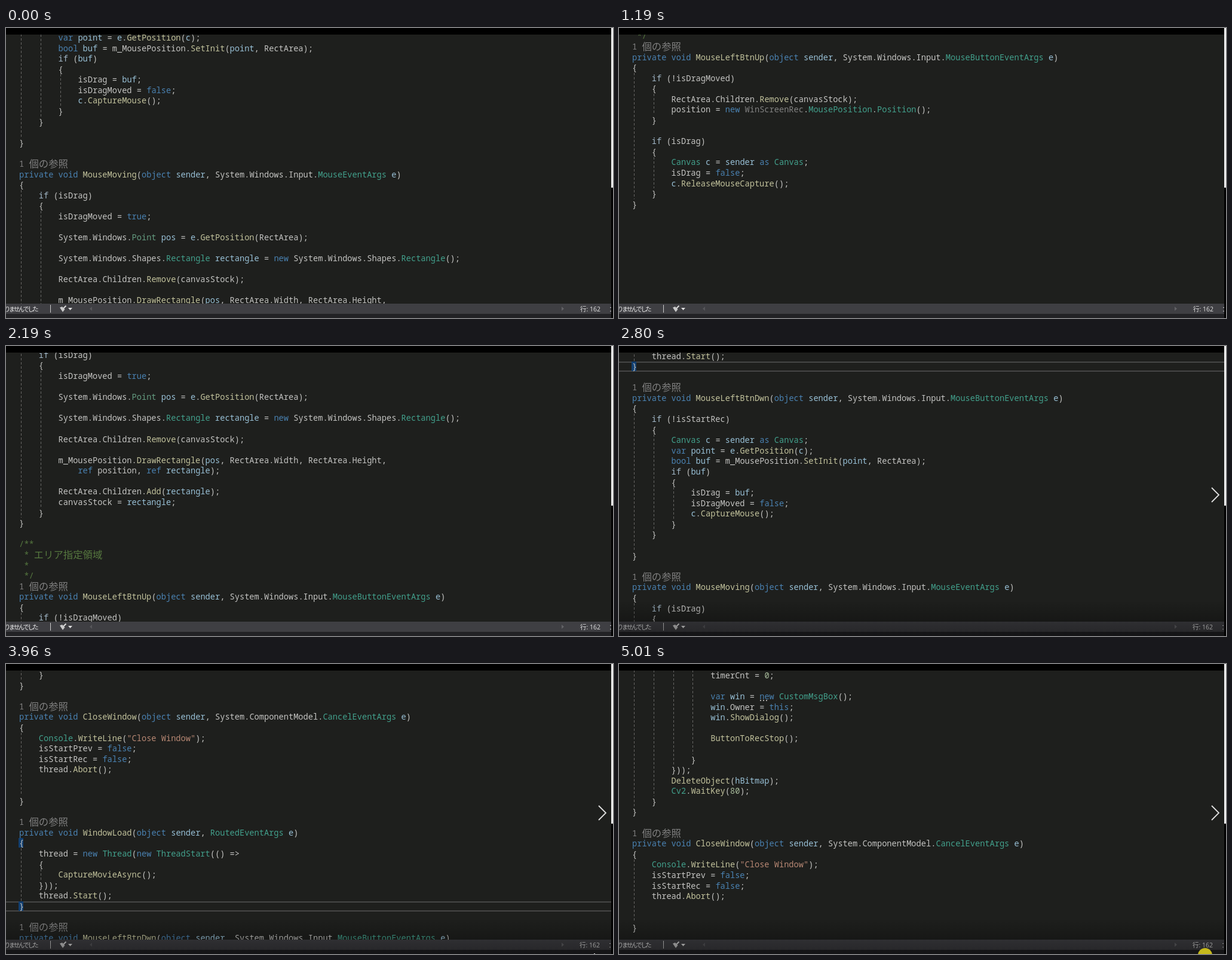
These frames come from a looping animation (1016 by 485 pixels, 5.08 s). An HTML page with a canvas:

```html
<!DOCTYPE html>
<html lang="ja">
<head>
<meta charset="utf-8">
<title>Code scroll</title>
<style>
html, body { margin: 0; width: 100%; height: 100%; overflow: hidden; background: #000; }
canvas { display: block; }
</style>
</head>
<body>
<canvas id="stage" width="1016" height="485"></canvas>
<script>
const ctx = document.getElementById('stage').getContext('2d');
const LOOP = 5080;
const LEFT = 22, COL = 8.2, LINE = 17.58;
const HOME = 244.5, NOTCH = 52.95;   // centre of line 0 at rest, wheel notch
const FIRST = -55;                   // index of the first line of the listing
const TOP = 11, BOTTOM = 461, RIGHT = 1013;

const code = `                timerCnt = 0;

                var win = new CustomMsgBox();
                win.Owner = this;
                win.ShowDialog();

                ButtonToRecStop();

            }
        }));
        DeleteObject(hBitmap);
        Cv2.WaitKey(80);
    }
}

1 個の参照
private void CloseWindow(object sender, System.ComponentModel.CancelEventArgs e)
{
    Console.WriteLine("Close Window");
    isStartPrev = false;
    isStartRec = false;
    thread.Abort();


}

1 個の参照
private void WindowLoad(object sender, RoutedEventArgs e)
{
    thread = new Thread(new ThreadStart(() =>
    {
        CaptureMovieAsync();
    }));
    thread.Start();
}

1 個の参照
private void MouseLeftBtnDwn(object sender, System.Windows.Input.MouseButtonEventArgs e)
{
    if (!isStartRec)
    {
        Canvas c = sender as Canvas;
        var point = e.GetPosition(c);
        bool buf = m_MousePosition.SetInit(point, RectArea);
        if (buf)
        {
            isDrag = buf;
            isDragMoved = false;
            c.CaptureMouse();
        }
    }

}

1 個の参照
private void MouseMoving(object sender, System.Windows.Input.MouseEventArgs e)
{
    if (isDrag)
    {
        isDragMoved = true;

        System.Windows.Point pos = e.GetPosition(RectArea);

        System.Windows.Shapes.Rectangle rectangle = new System.Windows.Shapes.Rectangle();

        RectArea.Children.Remove(canvasStock);

        m_MousePosition.DrawRectangle(pos, RectArea.Width, RectArea.Height,
            ref position, ref rectangle);

        RectArea.Children.Add(rectangle);
        canvasStock = rectangle;
    }
}

/**
 * エリア指定領域
 *
 */
1 個の参照
private void MouseLeftBtnUp(object sender, System.Windows.Input.MouseButtonEventArgs e)
{
    if (!isDragMoved)
    {
        RectArea.Children.Remove(canvasStock);
        position = new WinScreenRec.MousePosition.Position();
    }

    if (isDrag)
    {
        Canvas c = sender as Canvas;
        isDrag = false;
        c.ReleaseMouseCapture();
    }
}`.split('\n');

const words = s => new Set(s.split(' '));
const keywords = words('private void object var bool new as ref true false this');
const types = words('CustomMsgBox Cv2 CancelEventArgs Console RoutedEventArgs Thread ThreadStart ' +
  'MouseButtonEventArgs MouseEventArgs Canvas Rectangle MousePosition Position');
const locals = words('win hBitmap sender e c point buf pos rectangle');

const color = {
  plain: '#c4c4c2', keyword: '#4a82b2', branch: '#a2b8c8', type: '#42a08c', struct: '#649c80',
  method: '#c2c29c', local: '#98c0d6', string: '#b88874', number: '#a8bc9c', comment: '#56783f',
  lens: '#808080', faded: '#828282'
};

// Font size chosen so that one column is exactly COL wide
const mono = '"Noto Sans Mono", "Noto Sans Mono CJK JP", monospace';
const kanji = '"Noto Sans CJK JP", "Noto Sans Mono CJK JP", sans-serif';
ctx.font = `300 100px ${mono}`;
const codeFont = `300 ${COL * 100 / ctx.measureText('M').width}px ${mono}`;
const wideFont = `300 ${COL * 2}px ${kanji}`;

function pick(word, rest, line) {
  if (/^1 個/.test(line)) return color.lens;
  if (/^( \*|\/\*)/.test(line)) return color.comment;
  if (word[0] === '"') return color.string;
  if (/^\d/.test(word)) return color.number;
  if (word === 'if') return color.branch;
  if (word === 'WinScreenRec') return color.faded;
  if (word === 'Point') return color.struct;
  if (keywords.has(word)) return color.keyword;
  if (types.has(word)) return color.type;
  if (locals.has(word)) return color.local;
  if (/^\w/.test(word) && rest[0] === '(') return color.method;
  return color.plain;
}

function tokenize(line) {
  const out = [];
  let col = 0;
  for (const m of line.matchAll(/"[^"]*"|\w+|[^\x00-\x7f]+|\s+|[^\w\s"]/g)) {
    const text = m[0], wide = text.charCodeAt(0) > 127;
    if (text.trim()) out.push({ text, wide, x: LEFT + col * COL, fill: pick(text, line.slice(m.index + text.length), line) });
    col += text.length * (wide ? 2 : 1);
  }
  return out;
}
const lines = code.map(tokenize);

// Dashed guides between matching braces; four blocks open above the listing
function findGuides() {
  const open = [0, 4, 8, 12].map(col => ({ col, from: FIRST - 3 }));
  const out = [];
  code.forEach((line, i) => {
    const col = line.search(/\S/), row = FIRST + i;
    if (line[col] === '{') open.push({ col, from: row });
    if (line[col] === '}') out.push({ ...open.pop(), to: row });
  });
  return out;
}
const guides = findGuides();

const scroll = [
  [0, 0], [210, 2], [410, 3], [540, 4], [790, 8], [1190, 12], [1590, 11], [1790, 9], [1920, 8],
  [2190, 5], [2400, 2], [2610, -1], [2800, -3], [2980, -5], [3590, -7], [3800, -9], [3960, -10],
  [3990, -12], [4400, -13], [4950, -14]
];
const notchAt = t => scroll.filter(s => s[0] <= t).pop()[1];

function box(x, y, w, h, fill) {
  ctx.fillStyle = fill;
  ctx.fillRect(x, y, w, h);
}

function path(points, stroke, width) {
  ctx.beginPath();
  points.forEach(p => ctx.lineTo(...p));
  ctx.strokeStyle = stroke;
  ctx.lineWidth = width;
  ctx.stroke();
}

function shape(points, fill) {
  ctx.beginPath();
  points.forEach(p => ctx.lineTo(...p));
  ctx.fillStyle = fill;
  ctx.fill();
}

function drawCode(t) {
  const base = HOME - NOTCH * notchAt(t);
  const yOf = row => base + row * LINE;
  ctx.save();
  ctx.beginPath();
  ctx.rect(0, TOP, RIGHT, BOTTOM - TOP);
  ctx.clip();

  const current = Math.round(yOf(-21));
  box(0, current - 8, RIGHT, 2, '#464646');
  box(0, current + 7, RIGHT, 2, '#464646');
  for (const row of [-27, -21]) box(21, Math.round(yOf(row)) - 8, 8, 16, '#123f70');

  ctx.setLineDash([4, 3]);
  for (const g of guides) {
    const x = Math.round(LEFT + g.col * COL + 3) + .5;
    path([[x, Math.round(yOf(g.from + .5))], [x, Math.round(yOf(g.to - .5))]], '#666664', 1);
  }
  ctx.setLineDash([]);

  lines.forEach((tokens, i) => {
    const y = yOf(FIRST + i);
    if (y < -10 || y > BOTTOM + 20) return;
    for (const k of tokens) {
      ctx.font = k.wide ? wideFont : codeFont;
      ctx.fillStyle = k.fill;
      ctx.fillText(k.text, k.x, Math.round(y + (k.wide ? 6 : 5)));
    }
  });

  const hint = Math.round(yOf(-53)) + 6;
  for (let i = 0; i < 3; i++) box(236 + i * 5, hint, 2, 2, '#a8a8a8');
  ctx.restore();
}

function drawStatus(shift) {
  box(0, BOTTOM, RIGHT, 17, '#3f3f43');
  box(0, 478, RIGHT, 7, '#222225');
  ctx.fillStyle = '#f0f0f0';
  ctx.font = `10.4px ${kanji}`;
  ctx.letterSpacing = '-2.5px';
  ctx.fillText('りませんでした', -3, 474);
  ctx.letterSpacing = '0px';
  box(74, 463, 1, 13, '#d0d0d0');

  // brush
  path([[100.5, 464.5], [96, 469]], '#d8d8d8', 2);
  shape([[90, 467.5], [94, 466], [98.5, 470.5], [95, 475]], '#cacaca');

  shape([[104, 468], [111, 468], [107.5, 472]], '#e0e0e0');
  shape([[144, 466], [144, 473], [140, 469.5]], '#57575b');
  shape([[930, 466], [930, 473], [934, 469.5]], '#626266');
  ctx.font = `10.5px "Open Sans", ${kanji}`;
  ctx.fillStyle = '#e4e4e4';
  ctx.fillText('行: 162', 961 - shift, 474);
  box(1011 - shift, 467, 2, 1, '#c8c8c8');
  box(1011 - shift, 473, 2, 1, '#c8c8c8');
}

function drawOverlay(fade) {
  if (!fade) return;
  ctx.globalAlpha = fade;
  const shade = ctx.createLinearGradient(0, 425, 0, 485);
  shade.addColorStop(0, 'rgba(0,0,0,0)');
  shade.addColorStop(1, 'rgba(0,0,0,.42)');
  box(0, 425, RIGHT, 60, shade);
  path([[992, 237], [1004, 249], [992, 261]], '#dedede', 1.8);
  ctx.globalAlpha = 1;
}

function drawPointer(t) {
  if (t >= 3960 && t < 4190) box(984, 484, 2, 1, '#d8d8d8');
  if (t < 4950) return;
  ctx.beginPath();
  ctx.arc(981, 487, 12, 0, Math.PI * 2);
  ctx.fillStyle = '#c4b81c';
  ctx.fill();
}

function draw(t) {
  const fade = Math.min(1, Math.max(0, Math.floor((t - 2190) / 70) / 6));
  box(0, 0, 1016, 485, '#000');
  box(0, TOP, RIGHT, 485 - TOP, '#1e1f1d');
  drawCode(t);
  drawStatus(fade ? 1 : 0);
  drawOverlay(fade);
  drawPointer(t);
  box(RIGHT, 0, 3, 267, '#eeeeee');
}

function tick() {
  draw(performance.now() % LOOP);
  requestAnimationFrame(tick);
}
tick();
</script>
</body>
</html>
```
